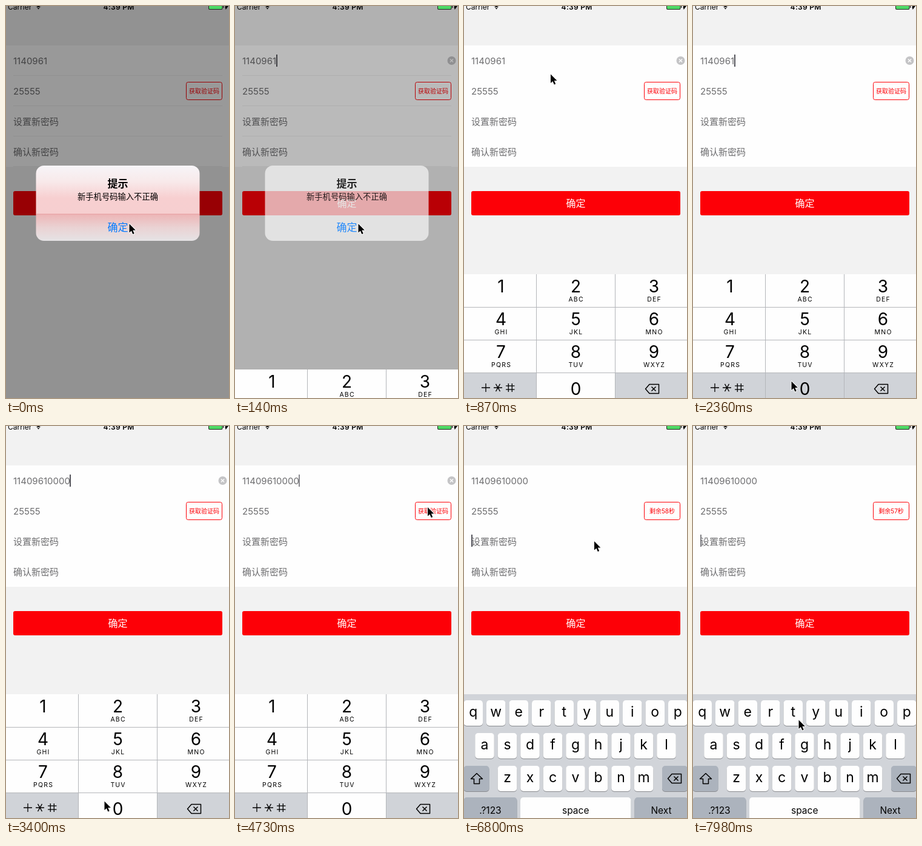
An HTML page with a canvas for the animation above (8000 ms loop, 368x646 px).

```html
<!DOCTYPE html>
<html lang="zh">
<head>
<meta charset="utf-8">
<title>设置新密码</title>
<style>
html, body { margin: 0; width: 100%; height: 100%; overflow: hidden; background: #f2f2f2; }
canvas { display: block; width: 368px; height: 646px; }
</style>
</head>
<body>
<canvas id="stage"></canvas>
<script>
const W = 368, H = 646, MID = W / 2, LOOP = 8000, STEP = 147.8;
const FONT = 'Inter, "Noto Sans CJK SC", "Noto Sans CJK", sans-serif';
const RED = '#fd0007', GREY = '#6e6e70', KEY_GREY = '#d0d3d8', KEY_DARK = '#acb3bd';
const LEFT = { align: 'left' };
const canvas = document.getElementById('stage');
const ctx = canvas.getContext('2d');
const dpr = window.devicePixelRatio || 1;
canvas.width = W * dpr;
canvas.height = H * dpr;

const clamp = v => Math.max(0, Math.min(1, v));
const ease = p => p * p * (3 - 2 * p);
const spring = ms => {
  const x = Math.max(0, ms) * 0.01826;
  return 1 - (1 + x) * Math.exp(-x);
};

function text(str, x, y, size, color, { weight = 400, align = 'center', gap = 0 } = {}) {
  ctx.font = `${weight} ${size}px ${FONT}`;
  ctx.textAlign = align;
  ctx.letterSpacing = gap + 'px';
  ctx.fillStyle = color;
  ctx.fillText(str, x + gap / 2, y);
}

function rect(x, y, w, h, color) {
  ctx.fillStyle = color;
  ctx.fillRect(x, y, w, h);
}

function box(x, y, w, h, r, color) {
  ctx.beginPath();
  ctx.roundRect(x, y, w, h, r);
  ctx.fillStyle = color;
  ctx.fill();
}

function stroke(color, width) {
  ctx.strokeStyle = color;
  ctx.lineWidth = width;
  ctx.lineJoin = 'round';
  ctx.stroke();
}

function poly(points) {
  ctx.beginPath();
  points.forEach(([x, y]) => ctx.lineTo(x, y));
  ctx.closePath();
}

// n evenly turned lines through one centre: plus, cross or star
function spokes(x, y, n, r, turn, color, width) {
  ctx.beginPath();
  for (let i = 0; i < n; i++) {
    const a = turn + i * Math.PI / n;
    const dx = r * Math.cos(a), dy = r * Math.sin(a);
    ctx.moveTo(x - dx, y - dy);
    ctx.lineTo(x + dx, y + dy);
  }
  stroke(color, width);
}

// Pointer moves: start, end, x, y
const MOVES = [
  [148, 800, 143, 112.5], [1250, 2250, 162.5, 618.5], [3399, 4140, 318, 134],
  [5170, 5320, 323, 140.5], [6290, 6500, 215, 190], [7100, 7960, 174.5, 484.5]
];

function drawPointer(t) {
  let x = 203.5, y = 359;
  for (const [from, to, toX, toY] of MOVES) {
    const p = ease(clamp((t - from) / (to - from)));
    x += (toX - x) * p;
    y += (toY - y) * p;
  }
  ctx.save();
  ctx.translate(x, y);
  poly([[0, 0], [0, 14.5], [3.4, 11.4], [5.8, 17], [8.2, 16], [5.8, 10.6], [10.4, 10.4]]);
  stroke('#fff', 2);
  ctx.fillStyle = '#000';
  ctx.fill();
  ctx.restore();
}

// Steps at which a zero appears, and at which its key is down
const TYPED = [17, 18, 20, 22];
const HELD = [16, 18, 19, 22];
const stepOf = t => Math.round(t / STEP);
const typedCount = t => TYPED.filter(s => s <= stepOf(t)).length;
const onPassword = t => t > 6480;

function caretAlpha(t) {
  if (t <= 0) return 0;
  const n = typedCount(t);
  const since = t - (onPassword(t) ? 6850 : n ? TYPED[n - 1] * STEP : 0);
  const p = since % 1000;
  const fadeIn = since < 1000 ? 1 : clamp(p / 180);
  return fadeIn * (1 - clamp((p - 420) / 180));
}

function drawCaret(t) {
  ctx.globalAlpha = caretAlpha(t);
  if (onPassword(t)) rect(12, 179, 2, 20, '#55555c');
  else rect(68 + 9.25 * typedCount(t), 80, 2, 20, '#55555c');
  ctx.globalAlpha = 1;
}

function drawForm(t, dim) {
  rect(0, 0, W, H, '#f2f2f2');
  rect(0, 65, W, 200, '#fefefe');
  const phone = '1140961' + '0'.repeat(typedCount(t));
  [phone, '25555', '设置新密码', '确认新密码'].forEach((row, i) => {
    text(row, 12, 95.5 + 50 * i, 15, GREY, LEFT);
    if (dim > 0) rect(12, 114 + 50 * i, 345, 1, '#efeff0');
  });
  drawCaret(t);

  if (t > 0 && !onPassword(t)) {
    box(350.5, 83, 14, 14, 7, '#c4c4c6');
    spokes(357.5, 90, 2, 3.6, Math.PI / 4, '#fff', 1.4);
  }

  ctx.beginPath();
  ctx.roundRect(297.5, 125.5, 59, 29, 3);
  stroke(RED, 1);
  const seconds = 59 - Math.floor((t - 5310) / 1034);
  text(seconds > 59 ? '获取验证码' : `剩余${seconds}秒`, 327, 143.7, 10, RED);

  box(12, 305, 345, 40, 3, RED);
  text('确定', 184.5, 331, 16, '#fff', { weight: 500 });
}

function drawStatus() {
  text('Carrier', 3, 5.5, 12, '#000', LEFT);
  text('4:39 PM', 186, 5.5, 12, '#000', { weight: 600, gap: 0.3 });
  for (const r of [4, 7]) {
    ctx.beginPath();
    ctx.arc(53.5, 5, r, -2.3, -0.84);
    stroke('#000', 1.6);
  }
  ctx.fillStyle = '#000';
  poly([[51.5, 3.2], [55.5, 3.2], [53.5, 5.6]]);
  ctx.fill();
  poly([[364.5, -4], [361.5, 1.6], [362.6, 6], [367, 0]]);
  ctx.fill();
  box(334, -4, 23.5, 10, 2, '#222');
  box(335, -3, 21.5, 8, 1.5, '#4cd964');
  rect(358, 0, 1.3, 3, '#222');
}

function gradient(y0, y1, colors) {
  const g = ctx.createLinearGradient(0, y0, 0, y1);
  colors.forEach((c, i) => g.addColorStop(i / (colors.length - 1), c));
  return g;
}

function drawAlert(alpha) {
  ctx.globalAlpha = alpha;
  if (alpha === 1) {
    // The blurred red button shows through until the panel starts to fade
    box(49.5, 263, 270, 80, [13, 13, 0, 0], gradient(263, 343, ['#f7f5f8', '#f8e9ea', '#f7cfd0', '#f6cfd0']));
    box(49.5, 343, 270, 44, [0, 0, 13, 13], gradient(343, 387, ['#edb5b6', '#ead2d3', '#e5e3e5']));
    rect(49.5, 342.5, 270, 1, '#e69c9d');
  } else {
    box(49.5, 263, 270, 124, 13, '#f9f9f9');
  }
  ctx.globalAlpha = Math.min(1, alpha * 1.25);
  text('提示', 184.5, 298.5, 17, '#000', { weight: 600 });
  text('新手机号码输入不正确', 184.5, 318.8, 13.3, '#000');
  text('确定', 184.5, 371.3, 17, '#007aff');
  ctx.globalAlpha = 1;
}

function drawDelete(x, y) {
  poly([[x - 11, y], [x - 4.5, y - 7.5], [x + 11, y - 7.5], [x + 11, y + 7.5], [x - 4.5, y + 7.5]]);
  stroke('#000', 1.5);
  spokes(x + 2.5, y, 2, 5, Math.PI / 4, '#000', 1.5);
}

const PAD = ['', 'ABC', 'DEF', 'GHI', 'JKL', 'MNO', 'PQRS', 'TUV', 'WXYZ'];
const COLS = [61, 184.5, 313.5];

function drawPad(t) {
  rect(0, 442, W, 216, KEY_GREY);
  rect(0, 442, W, 162, '#fefefe');
  if (!HELD.includes(stepOf(t))) rect(120, 604, 129, 54, '#fefefe');
  for (const x of [119, 249]) rect(x, 442, 1, 216, '#b4b6ba');
  PAD.forEach((letters, i) => {
    const x = COLS[i % 3], y = 442 + 54 * Math.floor(i / 3);
    text(i + 1, x, y + 30, 28, '#000');
    text(letters, x, y + 45.3, 10.5, '#000', { gap: 1.2 });
    rect(0, y + 54, W, 1, '#b4b6ba');
  });
  text('0', COLS[1], 641, 28, '#000');
  spokes(36, 629, 2, 7, 0, '#000', 1.3);
  spokes(56, 629, 3, 7, 0, '#000', 1.3);
  for (const d of [-3, 3]) {
    spokes(76.3, 629 + d, 1, 7.2, 0, '#000', 1.3);
    spokes(76.3 + d, 629, 1, 7, Math.PI / 2, '#000', 1.3);
  }
  drawDelete(310.5, 631);
}

function key(x, y, w, label, color = '#fefefe') {
  box(x, y + 1, w, 42, 5, '#8a8c90');
  box(x, y, w, 42, 5, color);
  const long = label.length > 1;
  text(label, x + w / 2, y + (long ? 26.5 : 27), long ? 15.5 : 23, '#000');
}

function drawLetters() {
  rect(0, 442, W, 216, '#d1d4d9');
  ['qwertyuiop', 'asdfghjkl', 'zxcvbnm'].forEach((row, i) => {
    const left = MID - (row.length * 37.5 - 6) / 2;
    [...row].forEach((c, j) => key(left + 37.5 * j, 452 + 54 * i, 31.5, c));
  });
  key(-0.5, 560, 42, '', KEY_DARK);
  key(327, 560, 42, '', KEY_DARK);
  key(-0.5, 612, 88, '.?123', KEY_DARK);
  key(93, 612, 182.5, 'space');
  key(281.5, 612, 88, 'Next', KEY_DARK);
  const half = [[9.5, 581.5], [4.5, 581.5], [4.5, 589.5]];
  const side = s => half.map(([x, y]) => [21 + s * x, y]);
  poly([[21, 572.5], ...side(1), ...side(-1).reverse()]);
  stroke('#000', 1.5);
  drawDelete(347.5, 581);
}

function drawKeyboard(t) {
  const swap = clamp((t - 6450) / 250);
  const drop = 216 * (1 - spring(t - 92));
  if (swap < 1) {
    ctx.save();
    ctx.translate(0, Math.round(drop));
    drawPad(t);
    ctx.restore();
  }
  if (swap > 0) {
    ctx.globalAlpha = swap;
    drawLetters();
    ctx.globalAlpha = 1;
  }
}

function draw(t) {
  const shown = 1 - clamp((t - 25) / 380);
  ctx.setTransform(dpr, 0, 0, dpr, 0, 0);
  drawForm(t, shown);
  if (shown > 0) {
    rect(0, 0, W, H, `rgba(0,0,0,${0.4 * shown})`);
    drawAlert(shown);
  }
  drawStatus();
  drawKeyboard(t);
  drawPointer(t);
}

// The picture advances in even steps
const start = performance.now();
function tick() {
  const t = (performance.now() - start) % LOOP;
  draw(Math.floor((t + 18) / STEP) * STEP);
  requestAnimationFrame(tick);
}
tick();
</script>
</body>
</html>
```
